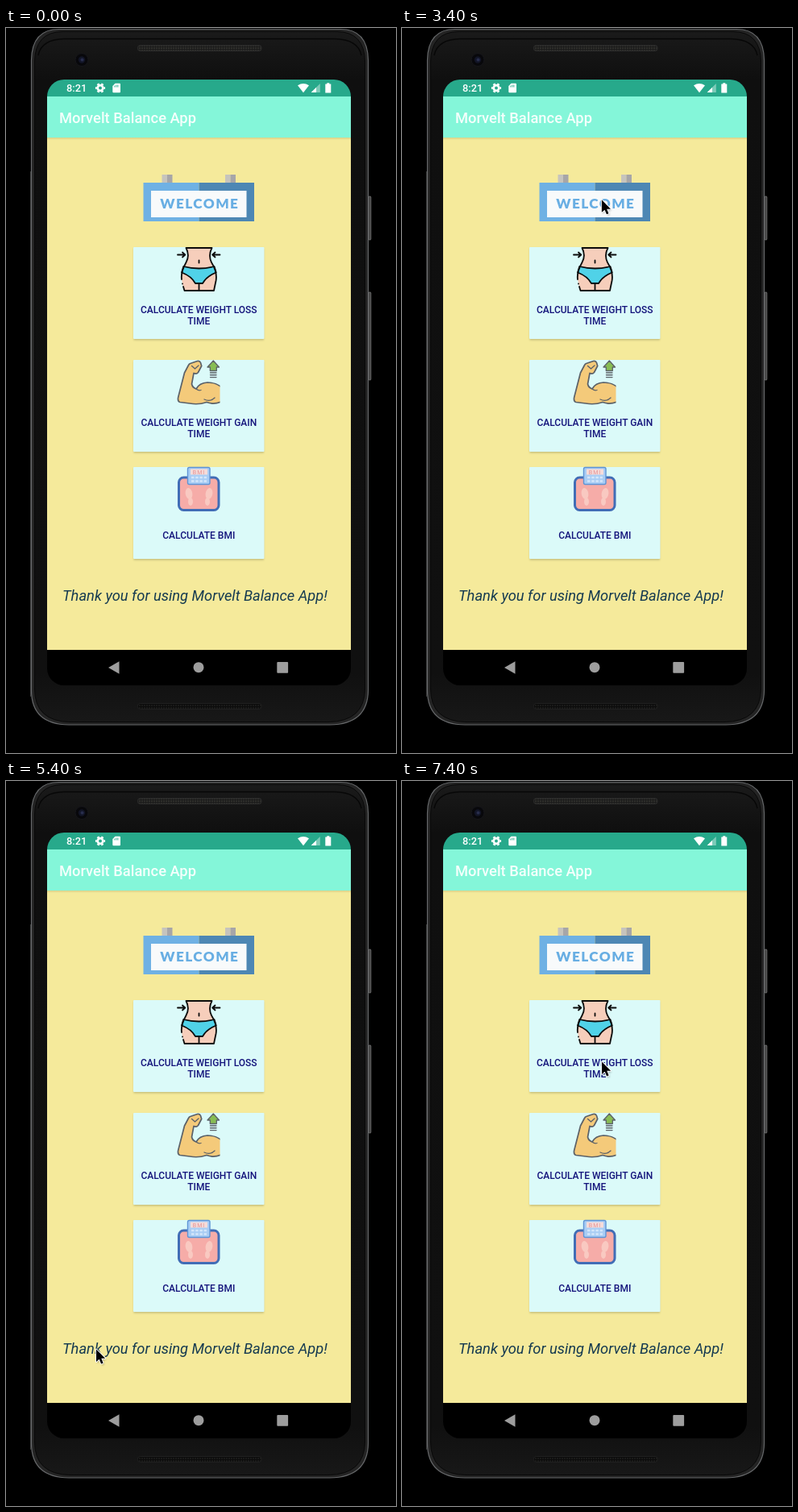
An HTML page that plays this animation: 484 by 900 pixels, repeating every 8000 ms.

```html
<!DOCTYPE html>
<html lang="en">
<head>
<meta charset="utf-8">
<title>Phone demo</title>
<style>
  html, body { margin: 0; width: 100%; height: 100%; overflow: hidden; background: #000; }
  svg { display: block; width: 484px; height: 900px; }
  text { font-family: Roboto, sans-serif; }
  .label { font-size: 12px; font-weight: 500; fill: #14147c; text-anchor: middle; }
  .round { stroke-linecap: round; stroke-linejoin: round; }
</style>
</head>
<body>
<svg viewBox="0 0 484 900" xmlns="http://www.w3.org/2000/svg">
  <defs>
    <linearGradient id="body" x1="0" y1="0" x2="0" y2="1">
      <stop offset="0" stop-color="#1a1a1a"/>
      <stop offset=".07" stop-color="#0f0f0f"/>
      <stop offset=".93" stop-color="#101010"/>
      <stop offset="1" stop-color="#181818"/>
    </linearGradient>
    <linearGradient id="barShade" x1="0" y1="0" x2="0" y2="1">
      <stop offset="0" stop-color="#6a6a3c" stop-opacity=".2"/>
      <stop offset="1" stop-color="#6a6a3c" stop-opacity="0"/>
    </linearGradient>
    <pattern id="mesh" width="3" height="3" patternUnits="userSpaceOnUse">
      <rect width="3" height="3" fill="#1c1c1c"/>
      <circle cx="1" cy="1" r=".8" fill="#44443c"/>
    </pattern>
    <pattern id="meshDark" width="3" height="3" patternUnits="userSpaceOnUse">
      <rect width="3" height="3" fill="#0c0c0c"/>
      <circle cx="1" cy="1" r=".8" fill="#2a2a28"/>
    </pattern>
    <clipPath id="screen"><rect x="51" y="64" width="377" height="752" rx="21"/></clipPath>
    <clipPath id="armBox"><rect x="212" y="411" width="53.5" height="57"/></clipPath>
    <filter id="soft" x="-20%" y="-20%" width="140%" height="150%"><feGaussianBlur stdDeviation="1.2"/></filter>
  </defs>

  <rect width="484" height="900" fill="#000"/>

  <!-- phone shell -->
  <g fill="#3c3c3c" stroke="#858585" stroke-width=".8">
    <rect x="450" y="209" width="2.800" height="54" rx="1"/>
    <rect x="450" y="328" width="2.800" height="109" rx="1"/>
  </g>
  <path d="M30.500 178V830" stroke="#3c3c3c" fill="none"/>
  <path d="M66 1.500H415Q449 1.500 449.500 40V822Q449 864.500 402 865H78Q31.500 864.500 31.500 822V40Q32 1.500 66 1.500Z" fill="#242424" stroke="#66686a" stroke-width="1.200"/>
  <path d="M70 4.500H411Q445 5 445.500 42V820Q445 861 400 861.500H80Q35.500 861 35.500 820V42Q36 5 70 4.500Z" fill="url(#body)" stroke="#080808"/>
  <path d="M40 34Q44 14 72 13.500H408Q437 14 441 34" fill="none" stroke="#070707" stroke-width="1.500"/>
  <rect x="163.500" y="21.500" width="153.500" height="7" rx="3" fill="url(#mesh)" stroke="#2c2c2c"/>
  <rect x="163.500" y="838.500" width="153.500" height="7" rx="3" fill="url(#meshDark)" stroke="#202020"/>
  <circle cx="94" cy="39.500" r="8" fill="#08080b" stroke="#17171b"/>
  <circle cx="94" cy="39.500" r="4.200" fill="#121526"/>
  <circle cx="94.500" cy="39.500" r="2" fill="#272d4c"/>

  <!-- screen -->
  <g clip-path="url(#screen)">
    <rect x="51" y="64" width="377" height="752" fill="#000"/>
    <rect x="51" y="136" width="377" height="636" fill="#f5ea9b"/>
    <rect x="51" y="64" width="377" height="21" fill="#27a98b"/>
    <rect x="51" y="85" width="377" height="51" fill="#84f6d9"/>
    <rect x="51" y="136" width="377" height="3" fill="url(#barShade)"/>
  </g>

  <!-- status bar -->
  <g fill="#fff">
    <text x="75" y="79.300" font-size="12.800" font-weight="500">8:21</text>
    <circle cx="117" cy="74.500" r="3.300" fill="none" stroke="#fff" stroke-width="2.700"/>
    <circle cx="117" cy="74.500" r="5.200" fill="none" stroke="#fff" stroke-width="1.800" pathLength="12" stroke-dasharray="1" stroke-dashoffset=".5"/>
    <path d="M135.500 68.800H141Q142 68.800 142 69.800V79.200Q142 80.200 141 80.200H133.300Q132.300 80.200 132.300 79.200V72Z"/>
    <path d="M134.800 71.500V73.500M136.800 70.500V73.500M138.800 70.500V73.500" stroke="#27a98b" stroke-width=".9"/>
    <path d="M362 71.300Q369 66.500 376 71.300L369 80.300Z"/>
    <path d="M389.800 69V80H378.700Z" opacity=".4"/>
    <path d="M385 73.800V80H378.700Z"/>
    <path d="M398.300 68.300H401.300V69.500H403.300V80.500H396.300V69.500H398.300Z"/>
  </g>
  <text x="66" y="118" font-size="18.340" font-weight="500" fill="#f5fffc">Morvelt Balance App</text>

  <!-- welcome sign -->
  <path d="M193.500 182H200V192.500H193.500ZM272 182H278.500V192.500H272Z" fill="#c6c4bd"/>
  <path d="M200 182H206.500V192.500H200ZM278.500 182H285V192.500H278.500Z" fill="#a7a6a8"/>
  <path d="M170.500 192H239.500V240H170.500Z" fill="#6fb1e4"/>
  <path d="M239.500 192H308V240H239.500Z" fill="#4d87b4"/>
  <path d="M180 202H298.500V235H180Z" fill="#f8fafb"/>
  <text x="240.300" y="224.200" text-anchor="middle" font-size="17.200" font-weight="900" letter-spacing="1.400" fill="#68aee3" style="font-family:Lato,sans-serif">WELCOME</text>

  <g id="cards"></g>

  <!-- waist icon -->
  <g class="round" stroke="#0b0b0b" stroke-width="1.800" fill="none">
    <path d="M223.500 273H255.500C252.500 279 252 285 255 291C260 299 262 306 260.500 314Q259 321 258 326H221.500Q219 319 218 312C217 305 219 298 223.500 291C227 285 226.500 279 223.500 273Z" fill="#f6cebb" stroke="none"/>
    <path d="M220.300 296Q239.500 301 258.500 296L260.800 303.500Q249 308 244 317H235Q230 308 218 303.500Z" fill="#50d2e8"/>
    <path d="M223.500 273H255.500M223.500 273C226.500 279 227 285 223.500 291C219 299 217 305 218 312M219 317.500V317.600M220 321L221.500 326H258Q259 321 260.500 314C262 306 260 299 255 291C252 285 252.500 279 255.500 273M239.500 318V326M239.500 288.500V291.500"/>
    <path d="M213 281.500H222M219 278.500L222.300 281.500L219 284.500M265.500 281.500H256.500M259.500 278.500L256.200 281.500L259.500 284.500"/>
  </g>

  <!-- arm icon -->
  <g class="round" clip-path="url(#armBox)" stroke="#5b6168" stroke-width="1.700">
    <path d="M226 419.500Q227 416.500 230 416L237.500 413.500Q240.500 412.800 241.500 415.500L242.700 419.500L238.500 427.500Q236.500 430 233 428.500L230.500 442Q231.500 446.500 236 448Q240 440.500 250 440Q260 440 267 445.500V464Q258 468 249 464.500Q239 468 228 466L216 464.500Q212.500 463.500 213.800 458L221.500 428Z" fill="#f4ca7a"/>
    <path d="M236 448Q239 450.500 242 449.500M246 461Q253 464.500 259 459M230.500 419.500L234.500 423L239 419" fill="none" stroke-width="1.300"/>
    <path d="M257.300 413L264.500 421H261.300V425.500H253.300V421H250Z" fill="#87bd54" stroke-width="1.300"/>
    <path d="M253.500 428H261M253.500 430.800H261M253.500 433.600H261" stroke-width="1.400"/>
  </g>

  <!-- scale icon -->
  <rect x="214.500" y="558" width="49.500" height="40.500" rx="6" fill="#f6aca8" stroke="#416db6" stroke-width="3"/>
  <g fill="#f9c9c1">
    <ellipse cx="227" cy="578" rx="4.300" ry="7" transform="rotate(-9 227 578)"/>
    <ellipse cx="229" cy="588" rx="3" ry="5"/>
    <ellipse cx="252" cy="578" rx="4.300" ry="7" transform="rotate(9 252 578)"/>
    <ellipse cx="250" cy="588" rx="3" ry="5"/>
  </g>
  <rect x="225.500" y="545.500" width="27.500" height="21" rx="2" fill="#a9cdf4" stroke="#5f94d5" stroke-width="1.400"/>
  <rect x="229" y="547.500" width="21" height="7" fill="#f5dcda"/>
  <text x="239.500" y="553.500" text-anchor="middle" font-size="7" letter-spacing="1" fill="#e58f91">BMI</text>
  <path d="M230 558H249M230 562.500H249" stroke="#d3e6fa" stroke-width="2.600" stroke-dasharray="3.500 1.700"/>

  <text x="70" y="711" font-size="18.340" font-style="italic" fill="#153a50">Thank you for using Morvelt Balance App!</text>

  <!-- navigation bar -->
  <g fill="#9d9d9d">
    <path d="M127 794L140.500 786.300V801.700Z"/>
    <circle cx="239" cy="793.700" r="6.500"/>
    <rect x="336.300" y="787" width="13.800" height="13.800" rx="1"/>
  </g>

  <g id="cursor" visibility="hidden">
    <path d="M2 3.500V19L6 16L8.500 21.500L11 20.500L9 15H13.500Z" fill="#000" opacity=".25" filter="url(#soft)"/>
    <path d="M1 1.500V17L4.700 13.800L7.100 19.500L9.600 18.400L7.300 12.800H12.100Z" fill="#000" stroke="#fff" stroke-width="1.800" stroke-linejoin="round" paint-order="stroke"/>
  </g>
</svg>
<script>
  const LOOP = 8000, STEP = 200, ENTER = 2200;
  // top edge, first baseline offset, lines
  const cards = [
    [272, 82.3, "CALCULATE WEIGHT LOSS", "TIME"],
    [412, 82.3, "CALCULATE WEIGHT GAIN", "TIME"],
    [545, 89.3, "CALCULATE BMI"]
  ];
  // time, x, y of the pointer tip
  const path = [
    [ENTER, 345, 225], [2600, 279, 207], [4000, 226, 215],
    [5400, 111, 704], [6600, 297, 411], [7400, 247, 347]
  ];
  const cursor = document.getElementById("cursor");

  document.getElementById("cards").innerHTML = cards.map(([y, base, ...lines]) => {
    const text = lines.map((s, i) =>
      `<text class="label" x="239.3" y="${y + base + i * 14}">${s}</text>`).join("");
    return `<rect x="158.5" y="${y + 1.5}" width="161.500" height="114" fill="#5b5a30" opacity=".3" filter="url(#soft)"/>
      <rect x="158" y="${y}" width="162.500" height="114" rx="1" fill="#dbfaf9"/>${text}`;
  }).join("");

  function pointAt(t) {
    const last = path[path.length - 1];
    if (t >= last[0]) return last.slice(1);
    const i = path.findIndex(p => p[0] > t);
    const [t0, x0, y0] = path[i - 1], [t1, x1, y1] = path[i];
    const u = (t - t0) / (t1 - t0), e = u * u * (3 - 2 * u);
    return [x0 + (x1 - x0) * e, y0 + (y1 - y0) * e];
  }

  function draw(now) {
    const t = Math.floor((now % LOOP) / STEP) * STEP;
    const shown = t >= ENTER;
    cursor.setAttribute("visibility", shown ? "visible" : "hidden");
    if (shown) cursor.setAttribute("transform", `translate(${pointAt(t)})`);
  }

  const start = performance.now();
  function tick() {
    draw(performance.now() - start);
    requestAnimationFrame(tick);
  }
  tick();
</script>
</body>
</html>
```
